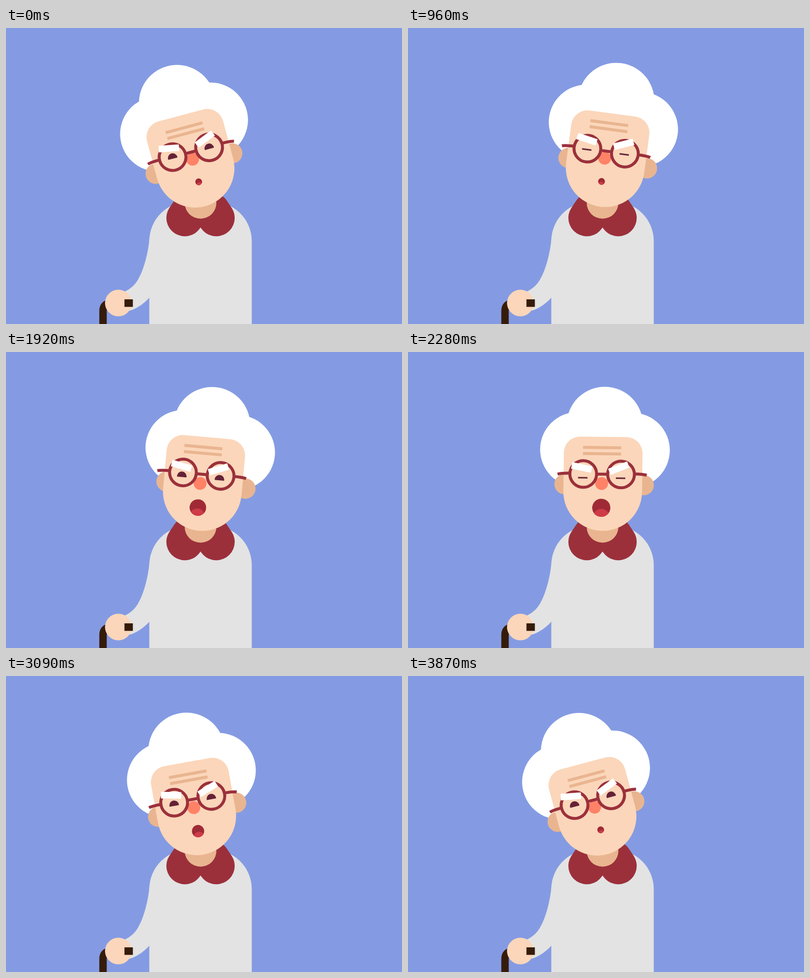
Recreate the animation shown at these times as an HTML page. Size 800 by 600 pixels, loop 3900 ms.

```html
<!DOCTYPE html>
<html lang="en">
<head>
<meta charset="utf-8">
<title>Grandmother</title>
<style>
  html, body { margin: 0; width: 100%; height: 100%; overflow: hidden; background: #849be3; }
  svg { display: block; width: 100vw; height: 100vh; }
  .skin { fill: #fbd6ba; }
  .shade { fill: #e9b590; }
  .frame { fill: none; stroke: #9b303b; stroke-width: 6; }
  .white { fill: #fff; }
  .wool { fill: #e3e3e3; }
  .wood { fill: #351c0a; }
</style>
</head>
<body>
<svg viewBox="0 0 800 600">
  <defs>
    <clipPath id="lips"><circle r="1"/></clipPath>
    <g id="eye" fill="#652236">
      <rect x="-9.5" y="-1.5" width="19" height="3"/>
      <path id="pupil" d="M-9.5 0A9.5 9.5 0 0 1 9.5 0Z"/>
    </g>
    <rect id="brow" x="-20.5" y="-6.7" width="41" height="13.4"/>
  </defs>
  <rect width="800" height="600" fill="#849be3"/>

  <path d="M196 610V573Q196 557.5 214 557.5" fill="none" stroke="#351c0a" stroke-width="15"/>
  <path class="wool" d="M290 425C287 460 276 499 262 517C255 526 246 532 238 535L249 573C262 571 281 557 290 546Z"/>
  <rect class="wool" x="289.5" y="352" width="207" height="340" rx="80"/>
  <circle class="skin" cx="227" cy="557.5" r="27"/>
  <rect class="wood" x="239.3" y="550" width="17" height="15.3"/>

  <path d="M361.2 385L370.5 371M424.8 385L415.5 371" stroke="#9b303b" stroke-width="74.5" stroke-linecap="round"/>
  <circle class="shade" cx="393" cy="354.5" r="32"/>

  <g id="head">
    <g id="hair" class="white">
      <circle cx="-1" cy="-179.5" r="77"/>
      <circle cx="-55" cy="-128.7" r="76"/>
      <circle cx="55" cy="-128.7" r="76"/>
      <rect x="-55" y="-170" width="110" height="100"/>
    </g>
    <g id="ears" class="shade">
      <circle cx="-80" cy="-52" r="20.5"/>
      <circle cx="80" cy="-52" r="20.5"/>
    </g>
    <path class="skin" d="M-79.5 -120A33 33 0 0 1 -46.5 -153H46.5A33 33 0 0 1 79.5 -120V-42A79.5 79.5 0 0 1 -79.5 -42Z"/>
    <g id="wrinkles" class="shade">
      <rect x="-38.5" y="-134" width="77" height="6"/>
      <rect x="-38.5" y="-121.5" width="77" height="6"/>
    </g>
    <circle id="nose" cy="-61.2" r="13" fill="#ff8267"/>
    <g id="eyes">
      <use href="#eye" x="-38.2" y="-74"/>
      <use href="#eye" x="38.2" y="-74"/>
    </g>
    <g id="glasses" class="frame">
      <circle cx="-38.2" cy="-75.7" r="27"/>
      <circle cx="38.2" cy="-75.7" r="27"/>
      <path d="M-11 -75.7H11M-90 -74.7C-84 -76.7 -76 -77 -65 -77M90 -74.7C84 -76.7 76 -77 65 -77"/>
    </g>
    <g id="brows" class="white">
      <use href="#brow" transform="translate(-37.5 -94.7) rotate(11)"/>
      <use href="#brow" transform="translate(37.5 -94.2) rotate(-22)"/>
    </g>
    <g id="mouth" clip-path="url(#lips)">
      <circle r="1" fill="#9f2a35"/>
      <circle cy="1.02" r=".9" fill="#cd3c48"/>
    </g>
  </g>
</svg>
<script>
const LOOP = 3900, STEP = 30;
const byId = id => document.getElementById(id);

const clamp = p => Math.min(1, Math.max(0, p));

// Eases from 0 to 1 between two times.
const ease = (t, from, to) => (1 - Math.cos(Math.PI * clamp((t - from) / (to - from)))) / 2;

const tilt = t => -15 + 24.3 * (ease(t, 400, 1075) - ease(t, 1200, 3870));

// Head shake: two full swings, then a half swing back to rest.
const turn = t => 6 * (
  2 * ease(t, 1110, 1380) - ease(t, 760, 1110) - 2 * ease(t, 1380, 1780)
  + 1.5 * ease(t, 2150, 2450) - ease(t, 2600, 3150) + 0.5 * ease(t, 3150, 3700));

const nod = t => 4.5 * (ease(t, 900, 1700) - ease(t, 2400, 3870));
const hairDrop = t => 3.5 * (ease(t, 1200, 3200) - ease(t, 3450, 3870));
const mouthSize = t => 7 + 11.5 * (ease(t, 1050, 2200) - ease(t, 2350, 3800));

const blink = (t, middle) => clamp((Math.abs(t - middle) - 50) / 100);
const eyeOpen = t => Math.min(blink(t, 950), blink(t, 2270));

function move(id, x, y, extra = '') {
  byId(id).setAttribute('transform', `translate(${x.toFixed(3)} ${y.toFixed(3)}) ${extra}`);
}

function draw(t) {
  const angle = tilt(t), side = turn(t), down = nod(t);
  move('head', 392.8, 325, `rotate(${angle.toFixed(3)})`);
  move('hair', 0.2 - 1.35 * side, hairDrop(t));
  move('ears', 0.4 - 0.95 * side, -0.9 * down);
  move('wrinkles', side, -0.25 * angle);
  move('nose', side, 0.65 * down);
  move('eyes', side, down);
  move('glasses', 0.2 + 0.75 * side, -0.35 * down);
  move('brows', side - 3.1, 0.95 * down);
  move('mouth', side, down - 13.7, `scale(${mouthSize(t).toFixed(3)})`);
  byId('pupil').setAttribute('transform', `scale(1 ${Math.max(0.001, eyeOpen(t)).toFixed(3)})`);
}

const start = performance.now();
function tick() {
  const t = (performance.now() - start) % LOOP;
  draw(Math.floor(t / STEP) * STEP);
  requestAnimationFrame(tick);
}
tick();
</script>
</body>
</html>
```
